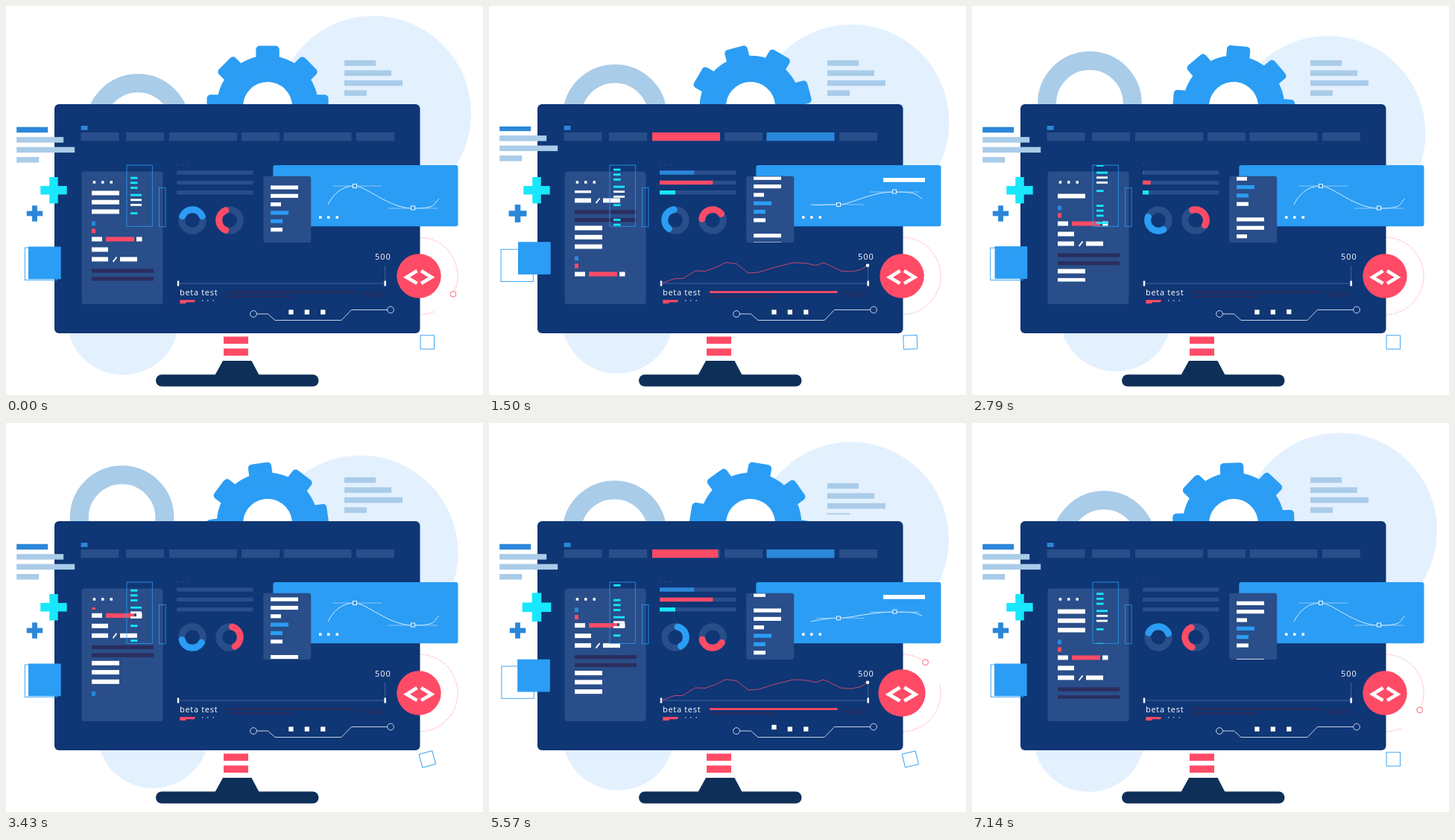
These frames come from a looping animation (640 by 523 pixels, 7210 ms). An HTML page:

```html
<!DOCTYPE html>
<html lang="en">
<head>
<meta charset="utf-8">
<title>Beta test dashboard</title>
<style>
html, body { margin: 0; width: 100%; height: 100%; overflow: hidden; background: #fff; }
svg { display: block; width: 100%; height: 100%; }
text { font: 11px "Open Sans", "Noto Sans", sans-serif; fill: #fff; }
</style>
</head>
<body>
<svg id="stage" viewBox="0 0 640 523"></svg>
<script>
const LOOP = 7210, TURN = 7178, HALF = TURN / 2;
const NAVY = '#0f3675', PANEL = '#294e8a', BLUE = '#2b9df4', MID = '#2b87d9',
  PALE = '#a9cce9', MIST = '#e3f0fe', PINK = '#ff4b66', CYAN = '#18e7fd',
  DARK = '#2a2d5e', WHITE = '#fff', BASE = '#0e3058';

// Markup helpers
const rect = (x, y, w, h, fill, more = '') =>
  `<rect x="${x}" y="${y}" width="${w}" height="${h}" fill="${fill}" ${more}/>`;
const disc = (x, y, r, fill, more = '') =>
  `<circle cx="${x}" cy="${y}" r="${r}" fill="${fill}" ${more}/>`;
const line = (d, stroke, width, more = '') =>
  `<path d="${d}" fill="none" stroke="${stroke}" stroke-width="${width}" ${more}/>`;
const group = (id, body) => `<g id="${id}">${body}</g>`;
const clip = (id, x, y, w, h) => `<clipPath id="${id}">${rect(x, y, w, h, WHITE)}</clipPath>`;
const clipped = (by, body) => `<g clip-path="url(#${by})">${body}</g>`;
const dots = (xs, y, s, fill) => xs.map(x => rect(x, y, s, s, fill)).join('');
const plus = (id, s, w, fill) => group(id,
  rect(-s / 2, -w / 2, s, w, fill) + rect(-w / 2, -s / 2, w, s, fill));
const paragraph = (x, y, first) =>
  [42, 63, 78, 30].map((w, i) => rect(x, y + i * 13.45, w, 7.5, i ? PALE : first)).join('');
// Several stacked copies of one column, ready to scroll
const column = (id, body, pitch) => group(id,
  [-1, 0, 1].map(k => `<g transform="translate(0 ${k * pitch})">${body}</g>`).join(''));

const bar = (x, y, w, fill, h = 6) => rect(x, y, w, h, fill);
const code = [249, 261.3, 274].map(y => bar(115, y, 37, WHITE)).join('') +
  bar(115, 290, 5, MID) + bar(115, 300, 5, PINK) +
  bar(115, 311, 14, WHITE) + bar(134, 311, 38, PINK) + bar(175, 311, 7.5, WHITE) +
  bar(115, 325, 22, WHITE) + bar(115, 338, 22, WHITE) + bar(153, 338, 23, WHITE) +
  line('M143.5 344.5L148.5 338', WHITE, 1.8) +
  bar(115, 354, 83, DARK, 5.2) + bar(115, 364.7, 83, DARK, 5.2);
const ticker = [229.7, 236.3, 243].map(y => bar(167, y, 9.5, CYAN, 2.8)).join('') +
  bar(167, 252.7, 15, CYAN, 2.8) + bar(167, 259.3, 15, WHITE, 2.8) +
  bar(167, 266, 15, WHITE, 2.8) + bar(167, 277.3, 9.5, CYAN, 2.8);
const list = [[37, WHITE], [37, WHITE], [14, WHITE], [24, BLUE], [16, BLUE], [16, WHITE]]
  .map(([w, c], i) => bar(355, 241.3 + i * 11.35, w, c, 5.2)).join('');

const teeth = Array.from({ length: 8 }, (_, i) =>
  rect(-15.7, -81.5, 31.4, 28, BLUE, `rx="5" transform="rotate(${i * 45})"`)).join('');
const hatch = Array.from({ length: 8 }, (_, i) =>
  line(`M${475 + i * 4} 383.5l3.5 8`, DARK, 1.6)).join('');
const donut = (id, x, fill) => {
  const a = 68 * Math.PI / 180, dx = 14.3 * Math.sin(a), y = -14.3 * Math.cos(a);
  return disc(x, 288, 14.3, 'none', `stroke="${PANEL}" stroke-width="9"`) +
    group(id, line(`M${-dx} ${y}A14.3 14.3 0 0 1 ${dx} ${y}`, fill, 9, 'stroke-linecap="round"'));
};

const chart = 'M231 373L249 366.5H260L277 356L290 356.5L303 352L318 344.7L332 346.5L348 359' +
  'L362 358L381 352L408 345L425 345.8L439 348.7L449 345L473 356.5L487 357L499 354.5L508 349';

const stage = document.getElementById('stage');
stage.innerHTML =
  '<defs>' + clip('codeBox', 101, 248, 109, 122.5) + clip('tickBox', 162, 214, 35, 82.5) +
  clip('listBox', 345, 229.5, 64, 88.5) + clip('leftBox', 0, 162, 120, 50.3) +
  clip('rightBox', 440, 72, 120, 51) + clip('chartBox', 0, 0, 0, 0) + '</defs>' +
  rect(0, 0, 640, 523, WHITE) +
  group('moon', disc(493, 144.3, 131, MIST)) +
  group('bubble', disc(157, 421, 75, MIST)) +
  group('hoop', disc(177, 161, 57.3, 'none', `stroke="${PALE}" stroke-width="25"`)) +
  group('gear', disc(0, 0, 68.3, BLUE) + teeth + disc(0, 0, 33, WHITE)) +
  clipped('rightBox', group('right', paragraph(454, 73, PALE))) +
  line('', PINK, 0.9, 'id="orbit" stroke-dasharray="1 2"') +
  group('planet', disc(0, 0, 3.9, WHITE, `stroke="${PINK}" stroke-width=".9"`)) +

  // monitor
  rect(65, 132, 490.5, 308, NAVY, 'rx="6"') +
  rect(292, 444.5, 33, 9.7, PINK) + rect(292, 460.5, 33, 9.7, PINK) +
  `<path d="M291 477H329.5L340 497H280Z" fill="${BASE}"/>` +
  rect(201, 495.5, 218.5, 16, BASE, 'rx="8"') +
  rect(100.7, 161, 8.8, 5.8, MID) +
  [[100.5, 51], [161, 51], [219, 91], [316, 51], [372.5, 91], [470, 51]]
    .map(([x, w]) => rect(x, 170, w, 11.3, PANEL)).join('') +
  rect(219, 170, 0, 11.3, PINK, 'id="navA"') + rect(372.5, 170, 0, 11.3, MID, 'id="navB"') +
  dots([229.5, 236.5, 243.5], 212.7, 1.2, '#45619a') +
  [221.3, 234.7, 248].map(y => rect(229, y, 102.5, 5.4, PANEL)).join('') +
  rect(229, 221.3, 0, 5.4, MID, 'id="rowA"') + rect(229, 234.7, 0, 5.4, PINK, 'id="rowB"') +
  rect(229, 248, 0, 5.4, CYAN, 'id="rowC"') +
  donut('donutA', 250, BLUE) + donut('donutB', 300, PINK) +

  // code panel
  rect(101.5, 222.5, 109, 178.5, PANEL, 'rx="4"') +
  dots([116.7, 128, 139.5], 235.2, 3.5, WHITE) +
  clipped('codeBox', column('code', code, 126)) +
  rect(162, 214, 34.3, 82.3, 'none', `stroke="${BLUE}" stroke-width=".8"`) +
  rect(205.5, 244.3, 8.5, 52.5, 'none', `stroke="${BLUE}" stroke-width=".8"`) +
  clipped('tickBox', column('tick', ticker, 67.5)) +

  // curve card and list
  rect(358.3, 214, 248.2, 82.2, BLUE, 'rx="3"') +
  rect(529, 231, 0, 5.7, WHITE, 'id="label"') +
  dots([420, 431, 442.5], 282.4, 3.5, WHITE) +
  line('', '#e9f5ff', 0.9, 'id="curve"') + line('', '#a5d5fb', 0.8, 'id="handles"') +
  ['knobA', 'knobB'].map(id => rect(0, 0, 5, 5, BLUE, `id="${id}" stroke="#fff" stroke-width=".9"`)).join('') +
  rect(345.2, 228.8, 64, 89.2, PANEL, 'rx="3"') +
  clipped('listBox', column('list', list, 77.5)) +

  // chart
  line('M231 373H509M508.6 349V370', '#4b689f', 0.9) +
  rect(229.8, 369.5, 2.4, 7, WHITE) + rect(507.4, 369.5, 2.6, 7, WHITE) +
  clipped('chartBox', line(chart, '#d84a72', 0.9)) +
  disc(508, 348.7, 2.3, WHITE, 'id="tip"') +
  '<text x="495" y="341" letter-spacing=".9">500</text>' +
  '<text x="233" y="389" letter-spacing=".7">beta test</text>' +
  `<path d="M233.3 395.3H254L253 398.2H242L241 400H233.3Z" fill="${PINK}"/>` +
  dots([263, 270, 277.5], 395.3, 1.4, '#c3d0e6') +
  rect(296, 383.2, 172, 2.8, DARK) + rect(296, 389.2, 87, 2.5, DARK) + hatch +
  rect(296, 383.2, 0, 2.8, PINK, 'id="load"') +
  line('M336.5 414H351.5L361 422.5H450L463.5 408.5H511.5', '#dde6f3', 0.9) +
  disc(332, 414, 4.4, 'none', 'stroke="#dde6f3" stroke-width=".9"') +
  disc(516, 408.5, 4.4, 'none', 'stroke="#dde6f3" stroke-width=".9"') +
  [0, 1, 2].map(i => rect(379.3 + i * 21.4, 408.4, 6.3, 6.3, WHITE, `id="hop${i}"`)).join('') +

  // floating pieces
  group('badge', disc(0, 0, 29.7, PINK) +
    line('M-2.5 -7L-16.5 1.8L-2.5 10M3 -7L17 1.8L3 10', WHITE, 4.6)) +
  clipped('leftBox', group('left', paragraph(14.2, 162.7, MID))) +
  plus('plusA', 35.4, 11.5, CYAN) + plus('plusB', 21.4, 6.8, MID) +
  group('frame', rect(25.3, 325, 43.3, 43.3, 'none', `stroke="${BLUE}" stroke-width=".9"`)) +
  group('block', rect(30, 323.5, 43.7, 43.7, BLUE)) +
  group('tile', rect(-9.2, -9.2, 18.4, 18.4, 'none', `stroke="${BLUE}" stroke-width=".9"`));

const el = {};
stage.querySelectorAll('[id]').forEach(e => el[e.id] = e);
const set = (id, attrs) => { for (const k in attrs) el[id].setAttribute(k, attrs[k]); };
const move = (id, x, y, more = '') => set(id, { transform: `translate(${x} ${y}) ${more}` });

// Motion helpers
const ease = (t, a, b) => {
  const u = Math.min(1, Math.max(0, (t - a) / (b - a)));
  return u * u * (3 - 2 * u);
};
const hold = (t, a, b, c, d) => ease(t, a, b) - ease(t, c, d);
const hump = (t, a, b) => t > a && t < b ? Math.sin(Math.PI * (t - a) / (b - a)) : 0;
const mix = (a, b, m) => a + (b - a) * m;
// Slide out through the bottom, come back from the top
const slide = (t, start) => {
  const mid = start + 290;
  return t < mid ? 50 * ease(t, start, mid) : 50 * (ease(t, mid, mid + 290) - 1) * (t < mid + 290);
};
const polar = deg => {
  const a = deg * Math.PI / 180;
  return [554 + 52 * Math.cos(a), 363 + 52 * Math.sin(a)];
};

function draw(t) {
  const h = t % HALF, turn = t / TURN * 360;
  const p = (1 - Math.cos(2 * Math.PI * t / 7140)) / 2;

  move('moon', -17.5 * p, 30.3 * p);
  move('hoop', -21.5 * p, -34 * p);
  move('bubble', 40.5 * p, -5 * p);
  move('gear', 351, 135, `rotate(${turn})`);
  move('donutA', 250, 288, `rotate(${-turn})`);
  move('donutB', 300, 288, `rotate(${turn - 90})`);

  const at = 28 + turn, [px, py] = polar(at), [gx, gy] = polar(at + 40);
  move('planet', px, py);
  set('orbit', { d: `M${gx} ${gy}A52 52 0 1 1 ${px} ${py}` });

  move('code', 0, 126 - 0.5 - (t / TURN * 378) % 126);
  move('tick', 0, (t / TURN * 270) % 67.5);
  move('list', 0, (t / TURN * 310) % 77.5);
  move('left', 0, slide(h, 956) + slide(h, 2175));
  move('right', 0, slide(t, 5498));

  set('navA', { width: 91 * hold(h, 100, 625, 1929, 2454) });
  set('navB', { width: 91 * hold(h, 318, 843, 2147, 2672) });
  set('rowA', { width: 46.3 * hold(h, 445, 970, 2300, 2825) });
  set('rowB', { width: 71.3 * hold(h, 538, 1063, 2394, 2919) });
  set('rowC', { width: 21 * hold(h, 632, 1157, 2488, 3013) });
  set('label', { width: 56 * hold(h, 350, 875, 2000, 2525) });
  set('load', { width: 171.5 * hold(h, 300, 900, 2074, 2599) });

  const from = 230 + 280 * ease(h, 2084, 2609), to = 230 + 280 * ease(h, 300, 900);
  el.chartBox.firstChild.setAttribute('x', from);
  el.chartBox.firstChild.setAttribute('y', 335);
  el.chartBox.firstChild.setAttribute('width', Math.max(0, to - from));
  el.chartBox.firstChild.setAttribute('height', 45);
  set('tip', { r: 2.3 * hold(h, 850, 1080, 2350, 2560) });

  const m = hold(h, 500, 820, 1893, 2215);
  const x1 = 468 + m, y1 = mix(242, 267, m), x2 = 546 - 2 * m, y2 = mix(272, 250, m);
  set('curve', { d: `M432 267C440 ${mix(251, 268.5, m)} 452 ${y1} ${x1} ${y1}` +
    `S${x2 - 33} ${y2} ${x2} ${y2}S572 ${mix(267, 254, m)} 581 259` });
  set('handles', { d: `M438.5 ${y1}H504M${x2 - 33} ${y2}H${x2 + 33}` });
  set('knobA', { x: x1 - 2.5, y: y1 - 2.5 });
  set('knobB', { x: x2 - 2.5, y: y2 - 3 });

  for (let i = 0; i < 3; i++) {
    const a = 195 + i * 210, b = 1885 + i * 210;
    move('hop' + i, 0, -4.5 * (hump(h, a, a + 500) + hump(h, b, b + 500)));
  }

  const beat = hump(h, 1650, 2750) ** 2;
  move('badge', 554, 363, `scale(${1 + 0.1 * beat})`);
  move('plusA', 64, 247.7, `scale(${1 + 0.14 * beat})`);
  move('plusB', 38.5, 279, `scale(${1 + 0.14 * hump(h, 700, 1950) ** 2})`);

  const s = hold(h, 100, 950, 1750, 2980);
  move('block', 9 * s, -6.3 * s);
  move('frame', -9.3 * s, 2.2 * s);
  const spin = [1446, 3274, 5426].reduce((sum, a) => sum + ease(t, a, a + 600), 0);
  move('tile', 565.3, 452, `rotate(${-90 * spin})`);
}

const start = performance.now();
(function tick() {
  draw((performance.now() - start) % LOOP);
  requestAnimationFrame(tick);
})();
</script>
</body>
</html>
```
